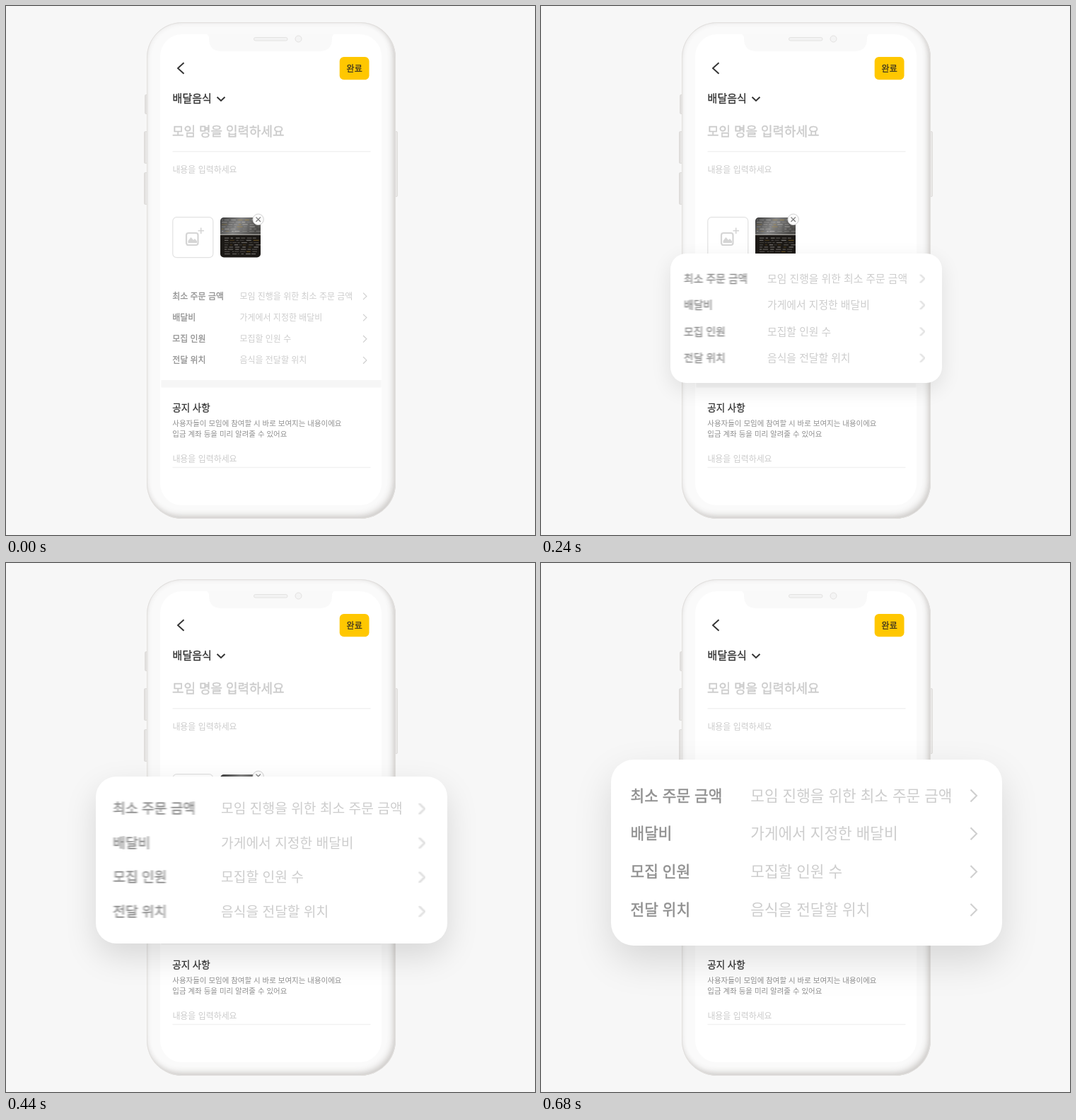
An HTML page for the animation above (1.48 s loop, 748x748 px).

```html
<!DOCTYPE html>
<html lang="ko">
<head>
<meta charset="utf-8">
<style>
html, body { margin: 0; width: 100%; height: 100%; overflow: hidden; background: #f7f7f7; }
div, svg { position: absolute; box-sizing: border-box; }
svg { left: 0; top: 0; }
text { font-family: "Noto Sans CJK KR", "Noto Sans CJK", "Noto Sans KR", sans-serif; white-space: pre; }
.medium { paint-order: stroke; stroke-width: .022em; }
.key { background: linear-gradient(90deg, #dddbd9, #efeeed); border: 1px solid #dfdddb; border-radius: 2px; width: 5px; }
#body {
  left: 199px; top: 23px; width: 352px; height: 702px; border-radius: 50px; background: #fafafa;
  box-shadow: inset 0 0 0 1px #e2e0de, inset 0 0 7px 1px rgba(70,60,50,.09), inset -4px -5px 9px rgba(70,60,50,.19);
}
#screen { left: 218px; top: 40px; width: 313px; height: 666px; border-radius: 31px; background: #fff; }
#card { background: #fff; }
</style>
</head>
<body>
<div class="key" style="left:196px;top:125px;height:28px"></div>
<div class="key" style="left:195px;top:177px;height:46px"></div>
<div class="key" style="left:195px;top:235px;height:46px"></div>
<div class="key" style="left:549px;top:177px;height:93px"></div>
<div id="body"></div>
<div id="screen"></div>
<svg id="page" width="748" height="748" fill="none">
  <defs>
    <linearGradient id="glare" x2="1" y2=".25">
      <stop stop-color="#3a3a3a"/><stop offset=".5" stop-color="#858585"/><stop offset="1" stop-color="#4d4c4a"/>
    </linearGradient>
    <clipPath id="thumb"><rect x="303" y="299" width="57" height="56.5" rx="5"/></clipPath>
  </defs>
  <path d="M284 40h180q-3 1-3 6q0 18-18 18H305q-18 0-18-18q0-5-3-6z" fill="#f9f9f9"/>
  <rect x="350.5" y="44.500" width="47.500" height="4.500" rx="2.250" fill="#f3f3f3" stroke="#e3e2e1"/>
  <circle cx="413.500" cy="46.500" r="4.500" fill="#f4f4f4" stroke="#e3e2e1"/>
  <path d="M251.500 80.300L243 88l8.500 7.700" stroke="#333" stroke-width="1.900"/>
  <rect x="471.700" y="72" width="41.800" height="32.200" rx="6" fill="#ffc700"/>
  <path d="M298.500 128.700l5.500 5.300l5.500-5.300" stroke="#333" stroke-width="1.900"/>
  <path d="M235.500 205.700h280M235.500 652.500h280" stroke="#f1f1f1" stroke-width="1.400"/>
  <rect x="235.800" y="298.700" width="57" height="57" rx="5.500" stroke="#e2e2e2" stroke-width="1.200"/>
  <g stroke="#d5d5d5" stroke-width="2.200">
    <rect x="255" y="321" width="16.500" height="17" rx="3"/>
    <path d="M257.500 335v-3l4-5l3.500 4l2-2l3 3.500v2.500z" fill="#d5d5d5" stroke="none"/>
    <path d="M275.700 313.500v8.500M271.500 317.700h8.500" stroke-width="1.600"/>
  </g>
  <g id="photo" clip-path="url(#thumb)">
    <rect x="303" y="299" width="57" height="25" fill="url(#glare)"/>
    <rect x="303" y="323" width="57" height="33" fill="#1c1916"/>
    <path d="M303 323.300h57" stroke="#a5a29d" stroke-width="1.200"/>
  </g>
  <circle cx="356.700" cy="301.800" r="7.700" fill="#fbfbfb" stroke="#d2d2d2"/>
  <path d="M353.500 298.600l6.400 6.400m0-6.400l-6.400 6.400" stroke="#777" stroke-width="1.200"/>
  <rect x="219.500" y="529" width="311" height="10.500" fill="#f6f6f6"/>
</svg>
<div id="card"></div>
<svg width="748" height="748" fill="none">
  <filter id="smear" x="-10%" y="-10%" width="120%" height="120%"><feGaussianBlur stdDeviation="1.5 .4"/></filter>
  <g id="rows"><g id="labels"></g><g id="hints"></g><g id="arrows"></g></g>
</svg>
<script>
const $ = id => document.getElementById(id);

function add(parent, tag, attrs, words) {
  const el = document.createElementNS("http://www.w3.org/2000/svg", tag);
  for (const k in attrs) el.setAttribute(k, attrs[k]);
  if (words) el.textContent = words;
  parent.appendChild(el);
}

// mid is the vertical centre of the glyphs
function write(parent, words, x, mid, size, color, medium) {
  const attrs = { x, y: mid + size * .36, "font-size": size, fill: color };
  if (medium) Object.assign(attrs, { class: "medium", stroke: color });
  add(parent, "text", attrs, words);
}

const page = $("page");
write(page, "완료", 481.6, 88.5, 12, "#3a3320", true);
write(page, "배달음식", 235.6, 131, 15, "#333", true);
write(page, "모임 명을 입력하세요", 235, 177.7, 17.95, "#cbcbcb", true);
write(page, "내용을 입력하세요", 235.4, 231.7, 11.95, "#cbcbcb");
write(page, "공지 사항", 235.3, 568, 13.45, "#333", true);
write(page, "사용자들이 모임에 참여할 시 바로 보여지는 내용이에요", 235.3, 590.7, 10.48, "#8f8f8f");
write(page, "입금 계좌 등을 미리 알려줄 수 있어요", 235.3, 605, 10.48, "#8f8f8f");
write(page, "내용을 입력하세요", 235.4, 641, 11.95, "#cbcbcb");

// menu board lines in the thumbnail
let seed = 7;
const rand = () => (seed = seed * 16807 % 2147483647) / 2147483647;
for (let y = 302; y < 353; y += 3.2) {
  if (Math.abs(y - 323) < 3) continue;
  const low = y > 323;
  for (let x = low ? 309 : 305; x < 356;) {
    const w = 2 + rand() * 6;
    const gold = rand() < .1 || (!low && x > 326 && x < 331);
    add($("photo"), "rect", {
      x, y, width: w, height: 1.1, fill: gold ? "#c99b2c" : "#e6e3de", opacity: .15 + rand() * .35
    });
    x += w + 1 + rand() * 3;
  }
}

const table = [
  ["최소 주문 금액", "모임 진행을 위한 최소 주문 금액"],
  ["배달비", "가게에서 지정한 배달비"],
  ["모집 인원", "모집할 인원 수"],
  ["전달 위치", "음식을 전달할 위치"]
];
table.forEach(([label, hint], i) => {
  const mid = 51 + i * 53.8;
  write($("labels"), label, 27.5, mid, 21.35, "#8f8f8f", true);
  write($("hints"), hint, 197.3, mid, 21.35, "#cdcdcd");
  add($("arrows"), "path", { d: `M508.500 ${mid - 8.5}l8.500 8.500l-8.500 8.500`, stroke: "#cfcfcf", "stroke-width": 2.1 });
});

const LOOP = 1480, STEP = 40;
const ease = [0, .01, .036, .08, .138, .216, .305, .4, .498, .597, .694, .772, .836, .889, .934, .97, .992, 1];
const mix = (a, b, p) => a + (b - a) * p;

function draw(time) {
  const p = ease[Math.min(Math.floor(time % LOOP / STEP), ease.length - 1)];
  const scale = mix(.561, 1, p), x = mix(219.8, 99, p), y = mix(381.8, 278, p);
  const moving = p > 0 && p < 1;
  const shade = .13 * Math.min(1, Math.max(0, p - .12) * 4);
  Object.assign($("card").style, {
    left: x + "px", top: y + "px",
    width: 553 * scale + "px", height: 263 * scale + "px",
    borderRadius: 32 * scale + "px",
    boxShadow: `0 ${mix(4, 22, p)}px ${mix(18, 54, p)}px rgba(0,0,0,${shade})`
  });
  $("rows").setAttribute("transform", `translate(${x} ${y}) scale(${scale})`);
  for (const id of ["labels", "arrows"]) $(id).style.filter = moving ? "url(#smear)" : "none";
}

const start = performance.now();
function tick() {
  draw(performance.now() - start);
  requestAnimationFrame(tick);
}
draw(0);
requestAnimationFrame(tick);
</script>
</body>
</html>
```
